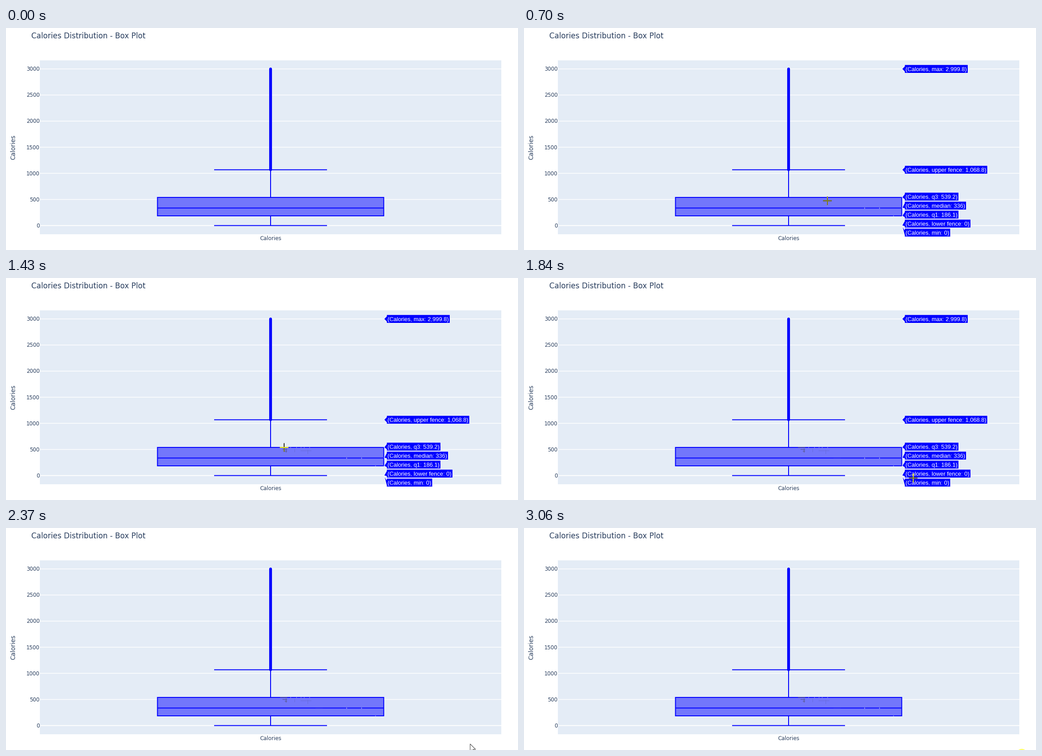
A matplotlib script for the animation above (3.17 s loop, 1134 by 494 pixels).

```python
import numpy as np
import matplotlib.pyplot as plt
from matplotlib.animation import FuncAnimation
from matplotlib.collections import LineCollection
from matplotlib.patches import Circle, Polygon, Rectangle
from matplotlib.path import Path

W, H, DPI = 1134, 494, 64
STEP, LOOP = 10, 3170
PT = 72 / DPI

INK, PAPER, BLUE, FILL = "#2a3f5f", "#e4ecf6", "#0000ff", "#7377fb"
CX = 586
BOX_L, BOX_R = 335.5, 836.6

fig = plt.figure(figsize=(W / DPI, H / DPI), dpi=DPI, facecolor="white")
ax = fig.add_axes([0, 0, 1, 1])
ax.set_xlim(0, W)
ax.set_ylim(H, 0)
ax.axis("off")


def y_of(v):
    return 439.6 - v * 0.11617


def line(xs, ys, color, width, z, **kw):
    art, = ax.plot(xs, ys, color=color, lw=width * PT, zorder=z,
                   snap=False, **kw)
    return art


def label(x, y, s, px, color=INK, font="DejaVu Sans", **kw):
    return ax.text(x, y, s, fontsize=px * PT, color=color, family=font,
                   va="baseline", **kw)


def rect_path(x0, y0, x1, y1):
    return Path([(x0, y0), (x1, y0), (x1, y1), (x0, y1), (x0, y0)],
                closed=True)


# Chart
ax.add_patch(Rectangle((75, 72), 1022, 387.2, fc=PAPER, lw=0, zorder=0))
for v in range(0, 3001, 500):
    y = y_of(v)
    line([75, 1097], [y, y], "white", 1.5 if v else 2, 1,
         solid_capstyle="butt")
    label(74.3, y + 4.2, str(v), 11.7, ha="right")

label(56, 23, "Calories Distribution - Box Plot", 16.65)
label(CX, 472.2, "Calories", 11.7, ha="center")
label(20.6, 265.4, "Calories", 13.7, ha="center", rotation=90,
      rotation_mode="anchor")

LOW, Q1, MED, Q3, HIGH, TOP = (
    y_of(v) for v in (0, 186.1, 336, 539.2, 1068.8, 2999.8))
ax.add_patch(Rectangle((BOX_L, Q3), BOX_R - BOX_L, Q1 - Q3, fc=FILL,
                       ec=BLUE, lw=2 * PT, joinstyle="miter", snap=False,
                       zorder=2))
strokes = [(BOX_L, MED, BOX_R, MED), (CX, Q3, CX, HIGH), (CX, Q1, CX, LOW),
           (461, HIGH, 711, HIGH), (461, LOW, 711, LOW)]
for x0, y0, x1, y1 in strokes:
    line([x0, x1], [y0, y1], BLUE, 2, 3, solid_capstyle="butt")
line([CX, CX], [HIGH, TOP], BLUE, 6.2, 4, solid_capstyle="round")

# Hover labels
tips, tip_paths = [], []


def add_tip(text, y, cy):
    t = label(845, cy + 4.5, text, 12.7, "white", "Liberation Sans", zorder=7)
    right = 845 + t.get_window_extent().width + 2.6
    left, half = 843, 9.4
    pts = [(837.3, y), (left, cy + 6), (left, cy + half), (right, cy + half),
           (right, cy - half), (left, cy - half), (left, cy - 6)]
    p = ax.add_patch(Polygon(pts, fc=BLUE, ec="white", lw=PT,
                             joinstyle="miter", zorder=6))
    tips.extend([t, p])
    tip_paths.append(rect_path(left, cy - half, right, cy + half))


for name, y, cy in [("max: 2,999.8", TOP, TOP),
                    ("upper fence: 1,068.8", HIGH, HIGH),
                    ("q3: 539.2", Q3, 375.3), ("median: 336", MED, 395.3),
                    ("q1: 186.1", Q1, 415.3), ("lower fence: 0", LOW, 435.3),
                    ("min: 0", LOW, 455.3)]:
    add_tip(f"(Calories, {name})", y, cy)


# Specks the pointer leaves behind on the box
def specks(segs, color, width, start):
    c = LineCollection([[s[:2], s[2:]] for s in segs], colors=color,
                       linewidths=width * PT, zorder=5)
    ax.add_collection(c)
    return c, start


def notches(xs, y):
    return [(x, y - 1.2, x, y + 1.2) for x in xs]


marks = [
    specks(notches((754, 787), MED) + notches((818,), Q1), "#a9acf5", 1.4, 640),
    specks(notches((630, 643, 653, 660, 672), Q3), "#8f92ee", 1.3, 1050),
    specks([(667.5, 382, 667.5, 391), (638.5, 380, 638.5, 387),
            (652, 384, 676, 384)], "#686bdc", 1, 1050),
    specks([(612, 381, 622, 381), (617, 384.5, 622, 384.5),
            (619.5, 379, 619.5, 388)], "#5c5d9c", 1.4, 1050),
    specks([(607, Q3, 623, Q3)], "#3a3aa0", 1.6, 1600),
    specks([(685, MED, 701, MED)], "#3f42f4", 1.2, 1640),
]

# Pointer: the cross inverts whatever lies below it
blue_lines = [rect_path(min(a, c) - 1, min(b, d) - 1,
                        max(a, c) + 1, max(b, d) + 1)
              for a, b, c, d in strokes + [(BOX_L, Q3, BOX_R, Q3),
                                           (BOX_L, Q1, BOX_R, Q1)]]


def cross_part(color, paths, z):
    art = line([], [], color, 1.8, z, solid_capstyle="butt")
    if paths:
        art.set_clip_path(Path.make_compound_path(*paths), ax.transData)
    return art


cross = [cross_part("#1b1309", None, 10),
         cross_part("#8c8804", [rect_path(BOX_L, Q3, BOX_R, Q1)], 11),
         cross_part("#ffff00", blue_lines, 12)]
cross_tip = cross_part("#ffff00", tip_paths, 13)

R = 9.5
CROSS_X = np.array([-R, R, np.nan, 0, 0])
CROSS_Y = np.array([0, 0, np.nan, -R, R])
ARROW = np.array([(0, 0), (0, 17), (4, 13), (6.5, 19), (9, 18), (6.5, 12),
                  (12, 12)])
arrow = ax.add_patch(Polygon(ARROW, fc="white", ec="#222222", lw=0.9 * PT,
                             joinstyle="miter", zorder=14))
click = ax.add_patch(Circle((1102.5, 504), 12.5, fc="#ffff66", lw=0,
                            zorder=15))

# time, x, y
ROUTE = np.array([
    (490, 1067, 488), (520, 1024, 477), (550, 950, 456), (580, 880, 438),
    (610, 818, 423), (640, 754, 405), (670, 702, 391), (700, 672, 384.5),
    (790, 655, 382), (900, 638, 381), (1030, 618, 379), (1060, 617.5, 377.5),
    (1200, 614.5, 375), (1420, 616, 377), (1540, 617.5, 378),
    (1570, 618, 379), (1660, 693, 400), (1750, 785, 424), (1840, 862, 445),
    (1870, 863, 445.5), (2110, 863, 445.5), (2140, 874, 448),
    (2230, 945, 462), (2350, 1028, 480.5), (2500, 1064, 487),
    (2650, 1089, 491)])


def pointer(t):
    held = (t - 10) // 30 * 30 + 10
    return [np.interp(held, ROUTE[:, 0], ROUTE[:, k]) for k in (1, 2)]


def draw(i):
    t = i * STEP
    x, y = pointer(t)
    shown = 500 <= t < 2670
    on_plot = y < 459
    hover = 610 <= t < 1870

    for art in tips:
        art.set_visible(hover)
    for art, start in marks:
        art.set_visible(t >= start)
    for art in cross + [cross_tip]:
        art.set_data(x + CROSS_X, y + CROSS_Y)
        art.set_visible(shown and on_plot)
    cross_tip.set_visible(hover and on_plot)
    arrow.set_xy(ARROW + (x, y))
    arrow.set_visible(shown and not on_plot)
    click.set_visible(t >= 3060)
    return []


anim = FuncAnimation(fig, draw, frames=LOOP // STEP, interval=STEP,
                     repeat=True, repeat_delay=0, cache_frame_data=False)
plt.show()
```
